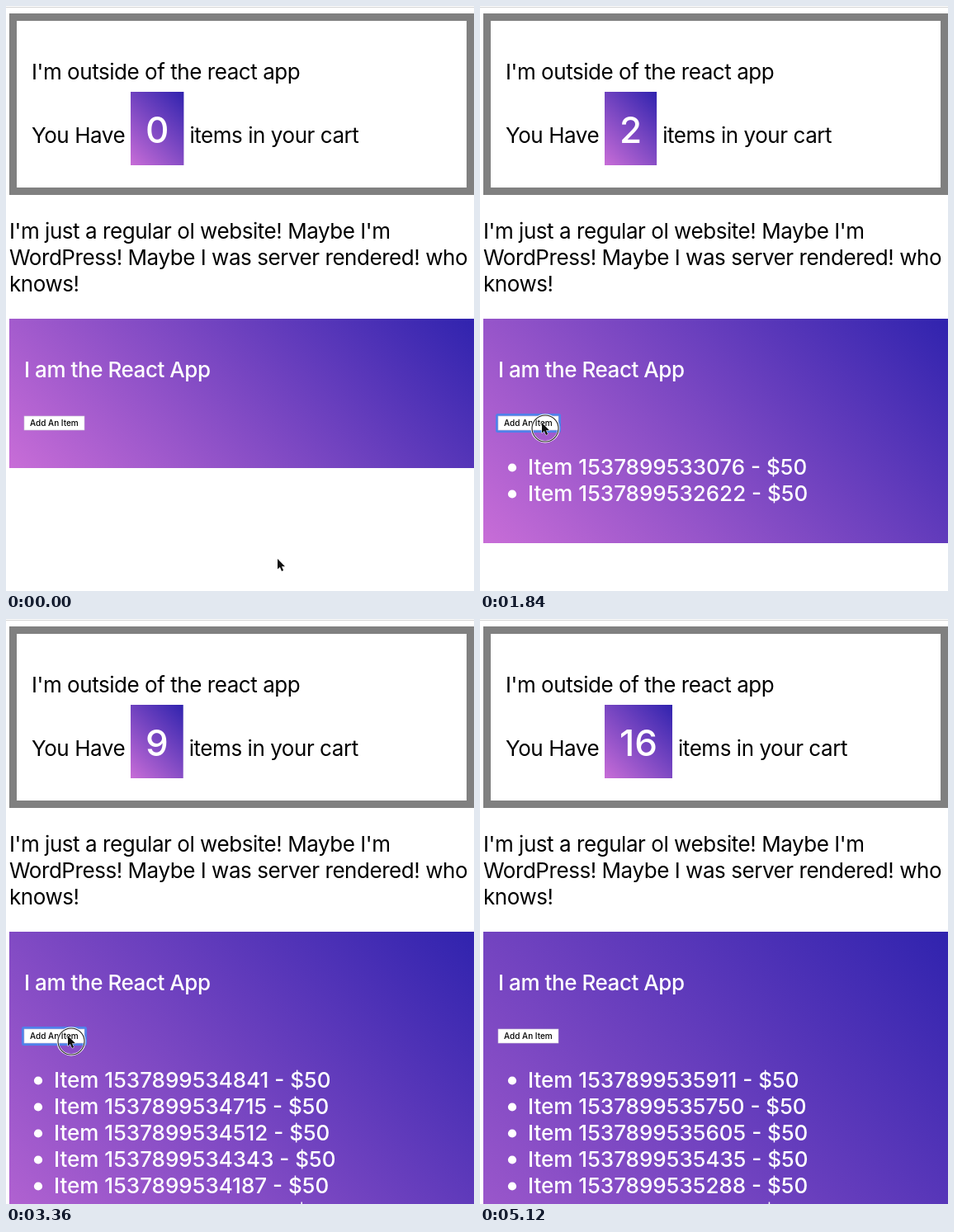
Recreate the animation shown at these times as an HTML page. Size 567 by 709 pixels, loop 5.2 s.

```html
<!DOCTYPE html>
<html lang="en">
<head>
<meta charset="utf-8">
<title>Cart outside the app</title>
<style>
  html, body { margin: 0; width: 100%; height: 100%; overflow: hidden; background: #fff; }
  svg { display: block; width: 567px; height: 709px; }
  text {
    font: 26px Inter, "Liberation Sans", sans-serif;
    font-optical-sizing: none;
    letter-spacing: -0.45px;
    white-space: pre;
  }
  .light { fill: #fff; }
  .light, .light text { font-weight: 500; }
  #list text { letter-spacing: 0; }
  #count { font-size: 44px; letter-spacing: 0; }
  #label { font-size: 10px; font-weight: 500; letter-spacing: 0; }
</style>
</head>
<body>
<svg viewBox="0 0 567 709">
  <defs>
    <linearGradient id="badgeFill" gradientUnits="userSpaceOnUse">
      <stop stop-color="#c86dd7"/><stop offset="1" stop-color="#3023ae"/>
    </linearGradient>
    <linearGradient id="appFill" gradientUnits="userSpaceOnUse">
      <stop stop-color="#c86dd7"/><stop offset="1" stop-color="#3023ae"/>
    </linearGradient>
  </defs>

  <rect y="1" width="567" height="1" fill="#d4d4d4"/>
  <rect x="8.5" y="13.5" width="554" height="211" fill="#fff" stroke="#808080" stroke-width="9"/>
  <text x="31" y="89">I'm outside of the react app</text>
  <text x="31" y="166">You Have</text>
  <rect id="badge" x="151" y="104" height="89" fill="url(#badgeFill)"/>
  <text id="count" class="light" x="169" y="166"></text>
  <text id="tail" y="166">items in your cart</text>

  <text x="4" y="282">I'm just a regular ol website! Maybe I'm</text>
  <text x="4" y="314">WordPress! Maybe I was server rendered! who</text>
  <text x="4" y="346">knows!</text>

  <rect id="app" x="4" y="379" width="563" fill="url(#appFill)"/>
  <text class="light" x="22" y="450">I am the React App</text>
  <rect id="focus" x="19" y="494" width="79" height="23" rx="2.5" fill="#5080ea"/>
  <rect x="22" y="497" width="73" height="17" fill="#fff" stroke="#c9c4d4" stroke-width=".6"/>
  <text id="label" x="29" y="509">Add An Item</text>
  <g id="list" class="light"></g>

  <g id="pointer">
    <g id="press" fill="none">
      <circle cx="4" cy="7" r="16.2" stroke="#fff" stroke-width="2.6"/>
      <circle cx="4" cy="7" r="16" stroke="#222" stroke-width="1.1"/>
    </g>
    <path d="M0 0V12.6L2.9 10 5 15 7.1 14.1 5 9.2H9Z" fill="#111" stroke="#fff" stroke-width="1" paint-order="stroke"/>
  </g>
</svg>
<script>
const STEP = 80, LOOP = 5200, ROWS = 6;
const $ = id => document.getElementById(id);
const set = (el, attrs) => { for (const k in attrs) el.setAttribute(k, attrs[k]); };

// Each item: the step at which it is added and the last digits of its id.
const items = [
  [14, 2622], [20, 3076], [25, 3498], [29, 3884], [33, 4187], [35, 4343],
  [37, 4512], [39, 4715], [41, 4841], [43, 4996], [45, 5159], [46, 5288],
  [48, 5435], [50, 5605], [52, 5750], [54, 5911]
];

// Pointer stops: step, x, y.
const stops = [
  [0, 329, 670], [1, 327, 662], [7, 33, 498], [13, 81, 505], [14, 81, 505],
  [15, 36, 504], [16, 75, 505], [54, 75, 505], [55, 112, 620], [56, 150, 740]
];

const rows = Array.from({ length: ROWS }, (_, i) => {
  const make = (tag, attrs) => {
    const el = document.createElementNS("http://www.w3.org/2000/svg", tag);
    set(el, attrs);
    return $("list").appendChild(el);
  };
  return {
    dot: make("circle", { cx: 39, cy: 559.5 + 32 * i, r: 5.1 }),
    text: make("text", { x: 58, y: 567.5 + 32 * i })
  };
});

// 45 degree CSS-style gradient over a box.
function slant(id, x, y, w, h) {
  const cx = x + w / 2, cy = y + h / 2, d = (w + h) / 4;
  set($(id), { x1: cx - d, y1: cy + d, x2: cx + d, y2: cy - d });
}

function pointerAt(step) {
  const i = stops.findIndex(s => s[0] > step);
  if (i < 0) return stops[stops.length - 1].slice(1);
  const [t0, x0, y0] = stops[i - 1], [t1, x1, y1] = stops[i];
  const p = (step - t0) / (t1 - t0), e = p * p * (3 - 2 * p);
  return [x0 + (x1 - x0) * e, y0 + (y1 - y0) * e];
}

function isPressed(step) {
  if (step === 23) return true;
  const adding = items.some(([at]) => at === step);
  return !adding && items.some(([at]) => at === step + 1);
}

function render(step) {
  const added = items.filter(([at]) => at <= step).reverse();
  const n = added.length;

  $("count").textContent = n;
  const badgeW = $("count").getComputedTextLength() + 36;
  set($("badge"), { width: badgeW });
  slant("badgeFill", 151, 104, badgeW, 89);
  set($("tail"), { x: 151 + badgeW + 7 });

  const appH = n ? 208 + 32 * n : 181;
  set($("app"), { height: appH });
  slant("appFill", 4, 379, 563, appH);

  rows.forEach(({ dot, text }, i) => {
    const item = added[i];
    text.textContent = item ? `Item 153789953${item[1]} - $50` : "";
    set(dot, { visibility: item ? "visible" : "hidden" });
  });

  const [x, y] = pointerAt(step);
  set($("pointer"), { transform: `translate(${x.toFixed(1)} ${y.toFixed(1)})` });
  set($("press"), { display: isPressed(step) ? "inline" : "none" });
  set($("focus"), { display: step >= 13 && step < 64 ? "inline" : "none" });
}

let shown = -1;
const start = performance.now();
function tick() {
  const step = Math.floor((performance.now() - start) % LOOP / STEP);
  if (step !== shown) render(shown = step);
  requestAnimationFrame(tick);
}
tick();
</script>
</body>
</html>
```
